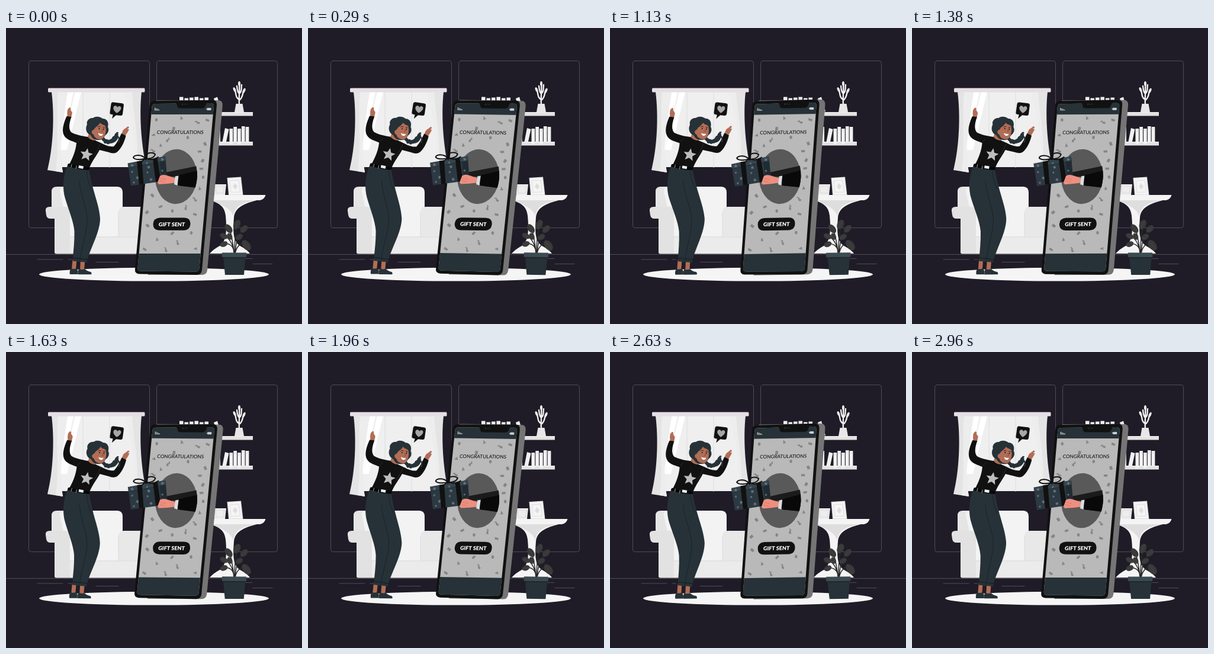
Write an HTML page with a canvas that moves like this. It is 500 px wide and 500 px high and loops after 3 s.

```html
<!DOCTYPE html>
<html lang="en">
<head>
<meta charset="utf-8">
<title>Gift sent</title>
<style>
html, body { margin: 0; width: 100%; height: 100%; overflow: hidden; background: #1f1c27; }
canvas { display: block; width: 500px; height: 500px; }
</style>
</head>
<body>
<canvas id="stage"></canvas>
<script>
const canvas = document.getElementById('stage');
const ctx = canvas.getContext('2d');
const ratio = Math.max(1, window.devicePixelRatio || 1);
canvas.width = canvas.height = 500 * ratio;

const INK = '#111111', SLATE = '#263238', SKIN = '#b26d55', ROSE = '#ee8f80';
const paths = new Map();

function path(d) {
  if (!paths.has(d)) paths.set(d, new Path2D(d));
  return paths.get(d);
}
function fill(color, d) {
  ctx.fillStyle = color;
  ctx.fill(path(d));
}
function line(color, width, d) {
  ctx.strokeStyle = color;
  ctx.lineWidth = width;
  ctx.lineCap = ctx.lineJoin = 'round';
  ctx.stroke(path(d));
}
function box(color, x, y, w, h, r = 0) {
  ctx.fillStyle = color;
  ctx.beginPath();
  ctx.roundRect(x, y, w, h, r);
  ctx.fill();
}
function oval(color, x, y, rx, ry = rx, turn = 0) {
  ctx.fillStyle = color;
  ctx.beginPath();
  ctx.ellipse(x, y, rx, ry, turn, 0, Math.PI * 2);
  ctx.fill();
}
function star(color, x, y, r, turn = 0) {
  ctx.fillStyle = color;
  ctx.beginPath();
  for (let i = 0; i < 10; i++) {
    const a = turn - Math.PI / 2 + i * Math.PI / 5;
    const q = i % 2 ? r * 0.45 : r;
    ctx.lineTo(x + q * Math.cos(a), y + q * Math.sin(a));
  }
  ctx.fill();
}
function label(text, x, y, font, color) {
  ctx.save();
  ctx.translate(x, y);
  ctx.transform(1, 0, -0.09, 1, 0, 0);
  ctx.font = font;
  ctx.fillStyle = color;
  ctx.textAlign = 'center';
  ctx.textBaseline = 'alphabetic';
  ctx.fillText(text, 0, 0);
  ctx.restore();
}
function sway(x, y, angle, draw) {
  ctx.save();
  ctx.translate(x, y);
  ctx.rotate(angle);
  ctx.translate(-x, -y);
  draw();
  ctx.restore();
}

// Degrees: up to +1 at a quarter, down to -1 at three quarters, linear.
function tilt(ms) {
  const p = (ms % 1500) / 1500;
  if (p < 0.25) return p * 4;
  return p < 0.75 ? 2 - p * 4 : p * 4 - 4;
}

function drawRoom() {
  const wall = '#5b5861';
  ctx.strokeStyle = wall;
  ctx.lineWidth = 0.8;
  for (const x of [38.5, 254.5]) {
    ctx.beginPath();
    ctx.roundRect(x, 55.5, 204, 282, 4);
    ctx.stroke();
  }
  line(wall, 0.8, 'M0 382.5H500M53 391H96M105 391H111M152 395.5H190M395 389.5H416M417 398.5H450');
}

function drawWindow() {
  box('#efefef', 84, 107, 143, 128);
  line('#e3e3e3', 1.5, 'M130 108V235M175 108V235');
  fill('#ffffff', 'M103 108H114L97 188L91 212Z');
  fill('#ffffff', 'M117 108H127L103 206H93Z');
  fill('#e4e4e4', 'M77 108H104C101 130 92 165 92 198C92 216 94 230 96 244L70 240C80 200 82 148 77 108Z');
  fill('#ededed', 'M88 108H104C101 130 92 165 92 198C92 216 94 230 96 244L84 242C90 200 84 150 88 108Z');
  fill('#e4e4e4', 'M201 108H229C225 145 228 195 237 235H216C223 190 211 145 201 108Z');
  fill('#ededed', 'M201 108H213C216 150 225 190 221 235H216C223 190 211 145 201 108Z');
  box('#e5dfe5', 71, 101.5, 163.5, 7, 1.5);
}

function drawSofa() {
  fill('#e5e5e5', 'M77 306V276Q77 268 86 268H120V320H77Z');
  fill('#f3f3f3', 'M99 312L91 276Q90 268 98 268H188Q197 268 197 278V330H99Z');
  box('#f3f3f3', 100, 310, 126, 48);
  fill('#e8e8e8', 'M190 310Q191 302 199 302H238V353H190Z');
  box('#ebebeb', 82, 352, 147, 29.5, 3);
  fill('#e2e2e2', 'M67 309Q66 302 74 302H101Q108 303 108 312V381H87Q82 381 82 375V322H75Q69 322 68 316Z');
  line('#d7d7d7', 0.8, 'M108 353H226M190 311V353');
}

function drawShelves() {
  box('#e2e2e2', 285, 142, 132, 6.5);
  box('#f0f0f0', 285, 142, 132, 1.5);
  box('#e2e2e2', 285, 192, 132, 6.5);
  box('#f0f0f0', 285, 192, 132, 1.5);

  for (let i = 0; i < 6; i++) box('#f0f0f0', 293 + i * 8.5, 116.5 + (i * 2 % 3), 6.5, 26);
  fill('#f0f0f0', 'M351 119L357 116.5L364 141H357Z');

  box('#efefef', 355, 167, 7, 25);
  fill('#f1f1f1', 'M370 169L376.5 171L372 192H365.5Z');
  for (let i = 0; i < 5; i++) {
    box('#f1f1f1', 377.5 + i * 6.8, [170, 167, 170, 166, 167][i], 5.7, 26);
  }
  line('#d5d5d5', 0.7, 'M378 174H383M385 171H390M392 174H397M398.5 170H403.5M405 171H410');

  line('#f2f2f2', 2.4, 'M394 129C393 119 395 108 394 93M394 121C386 117 390 108 385 102M394 122C402 116 398 109 403 104M394 111C390 107 391 103 390 98M395 110C399 106 397 101 398 96');
  oval('#f2f2f2', 394, 94, 2, 4);
  oval('#f2f2f2', 386, 104, 2, 4, -0.35);
  oval('#f2f2f2', 402, 106, 2, 4.5, 0.4);
  fill('#e7e7e7', 'M388.5 128H399.5L402 142H386Z');
}

function drawTable() {
  fill('#f4f4f4', 'M343 289H432C406 295 387 301 385 320C383 347 384 362 397 369Q408 375 412 381H344Q351 373 363 367C373 358 373 338 371 317C369 299 358 296 343 289Z');
  fill('#dedede', 'M344 290H428C402 294 386 299 384 318C379 302 357 296 344 290Z');
  fill('#f4f4f4', 'M338 282H438.5Q437 289 429 291H338Z');

  fill('#ededed', 'M352 264H372L370 282H352Z');
  line('#d5d5d5', 0.8, 'M355 267H369L367.5 279H355Z');
  fill('#e0e0e0', 'M373.5 253L397 251.5L400.5 282H376Z');
  fill('#f5f5f5', 'M375 254.2L396 253L399 281H377.5Z');
  line('#d9d9d9', 0.8, 'M378.5 258L393 257L395.5 277L380.5 277.5Z');
  fill('#dedede', 'M386.5 262L391 267L388 273L383 268Z');
}

function drawPlant() {
  line('#292929', 1.5, 'M385 381C384 365 380 347 377 336M386 381C386 362 388 344 391 334M387 381C388 362 393 346 403 341M387 381C389 370 396 362 404 364M385 378C384 367 376 363 366 364M384 372C381 362 376 354 369 352');
  const leaf = (x, y, rx, ry, turn) => {
    oval('#393939', x, y, rx, ry, turn);
    ctx.save();
    ctx.translate(x, y);
    ctx.rotate(turn);
    line('#4b4b4b', 0.5, `M0 ${-ry + 1}V${ry - 1}`);
    ctx.restore();
  };
  leaf(376, 339, 5.2, 8.5, -0.65);
  leaf(390, 332, 5.5, 8.5, 0.45);
  leaf(402, 339.5, 5, 7.5, 0.8);
  leaf(406, 367, 6.2, 10, -0.65);
  leaf(368, 351.5, 4.6, 7, -1.15);
  leaf(368, 365, 4.5, 6.6, 1.2);
  leaf(394, 353, 4.6, 6.5, 1.05);
  leaf(378, 352, 4, 6, -0.5);
  fill(SLATE, 'M367 386H404.5L402 417H370Z');
  fill('#1e282d', 'M367 386H404.5L404.2 389H367.3Z');
  box('#3c4a51', 364.8, 379.5, 41.4, 7.5, 0.5);
}

function drawWoman() {
  // Feet
  fill(SKIN, 'M112.5 391H119.5L118 408H111Z');
  fill(SKIN, 'M126 392H133.5L132 409H125Z');
  fill(SLATE, 'M110 406Q114 408 119 406L121.5 410V416H108Q106.5 411 110 406Z');
  fill(SLATE, 'M123 406.5Q128 409 133 407Q137 411 143 412Q145.5 414 144 416.3H121.5Q121 411 123 406.5Z');

  // Trousers
  fill(SLATE, 'M104 232C96 249 95 272 100 288C106 308 114 326 115.5 343C116 360 114 376 112.5 393.5L136.5 396C141 374 159 346 159 322C158 299 145 273 140 237Z');
  line('#1a2429', 1, 'M124 258C126 287 139 306 137 330C135 352 127 371 125 393M136 242C137 252 140 264 144 272');
  line('#182125', 1.3, 'M113.5 388L137.5 391');

  // Hands and neck
  fill(SKIN, 'M104 151C103 145 103 140 104.5 137L107.5 134L109.5 135.5L109 138L112 143L110 152Z');
  fill(SKIN, 'M195 181C196 175 198 171 201 170L206 166L208 168L205 171L208 171L206 175L201 183Z');
  fill(SKIN, 'M140 179L152 182L151 194Q141 194 137 186Z');

  // Top
  fill(INK, 'M102.5 149L110.5 150C107 160 105 170 110 176C117 180 126 182 138 184Q143 190 151 190L160 194C168 198 175 201 182 200C188 194 191 186 195 178L202.5 182C200 193 194 205 187 210Q182 213 174 210L158 206C153 216 144 226 140 239L106 232C113 219 118 207 119 194C112 191 103 189 99 183C93 175 97 161 102.5 149Z');
  line('#333333', 0.8, 'M159 196Q156 205 148 217M120 192L125 187');
  star('#bdbdbd', 135.7, 214, 11.3, 0.2);

  // Belt
  line('#070707', 5, 'M106.5 231.5Q121 236 138.5 237.5');
  fill('#eeeeee', 'M123 232L131 233.5L130.2 238L122.3 236.5Z');
  line('#d0d0d0', 0.8, 'M111 230.5L110 235M119 233L118.3 237.5');

  // Hair and face
  fill(SLATE, 'M143 181C136 179 133 170 137 163C135 157 141 151 147 152C152 148 160 150 163 153C171 153 174 160 172 167C175 173 172 178 168 181L163 188C153 191 146 188 143 181Z');
  line(SLATE, 5.5, 'M163 186Q169 194 176 192Q184 192 187 184');
  for (let i = 0; i < 5; i++) {
    oval(SLATE, 169 + i * 4.3, 190.5 + [1, 2, 0.5, -4, -9][i], 4.3, 3.1, -0.6 - i * 0.15);
  }
  line(SLATE, 2.2, 'M187 181Q186 176 189 177M188 182Q193 187 190 193');
  fill(SKIN, 'M145 174C147 172 149 172 150 169C153 166 156 165 159 160C162 164 166 163 168 166C170 173 168 183 163 187C157 190 149 186 148 180Q144 179 145 174Z');
  oval(INK, 157.5, 170, 0.8, 1.2);
  oval(INK, 164.8, 171, 0.8, 1.2);
  line(INK, 0.8, 'M155.5 167Q157.5 165.5 159.5 166.8M163.8 168Q165.6 167 167 168.6');
  line('#7e4437', 0.7, 'M162 171L163.5 175L161 175.4');
  fill('#ffffff', 'M155 177Q160 180 164.5 178.5Q163 183.5 159 182.5Q156 181.5 155 177Z');
  line('#74362f', 0.5, 'M155 177Q156 181.5 159 182.5Q163 183.5 164.5 178.5');
}

function drawBubble() {
  fill(INK, 'M181.5 125.4L196.3 127.3Q199.3 127.8 198.9 130.8L197 145.5Q196.5 148.3 193.5 148L186 147.2L179 153.3L180.7 146.3L178 146Q175 145.5 175.5 142.5L177.5 128.5Q178 125 181.5 125.4Z');
  fill('#a6a6a6', 'M187 143.8C182 139.5 180 135.5 182.2 132.5C184.5 130 187.6 131.5 188.2 134.2C189.6 131.5 193 131.2 194.3 134.2C195.3 138 191 141.5 187 143.8Z');
}

const bits = [
  254,155, 296,152, 323,159, 340,156, 283,170, 249,181, 274,189, 307,185,
  336,196, 261,198, 248,207, 327,209, 332,224, 239,225, 333,252, 330,238,
  247,283, 327,271, 319,289, 261,302, 238,311, 281,309, 304,303, 319,315,
  239,334, 255,357, 290,362, 281,347, 313,346, 320,373, 270,374, 234,374
];
const bitShapes = [
  'M-2 -3H2.5V3H-2Z',
  'M-3 -2L3.5 -1L1 3.5Z',
  'M-2 -4Q2 -3 1 -1Q0 1 3 3L0 5Q-3 2 -1.5 0Q0 -2 -3 -3Z',
  'M-3.5 -1.5L3 -2.5L3.5 1L-2.5 2Z'
];

function drawConfetti() {
  for (let i = 0; i < bits.length / 2; i++) {
    const x = bits[2 * i], y = bits[2 * i + 1];
    if (i % 7 === 0) {
      oval('#858585', x, y, 2.2, 2.8);
      continue;
    }
    ctx.save();
    ctx.translate(x, y);
    ctx.rotate(Math.sin(i * 2.3) * 0.9);
    fill('#858585', bitShapes[i % 4]);
    ctx.restore();
  }
}

function drawGift() {
  fill('#2c3942', 'M206 229L269 217L272 251L270 258L211 266.5Z');
  fill('#202b32', 'M259 219L269 217L272 251L263 259Z');
  fill('#34434c', 'M205.5 228.5L269 216.5L270.5 224L206.5 236Z');
  line('#202b32', 0.7, 'M206.5 236.5L270 224.5');
  const spots = [213,232, 238,228, 264,222, 213,243, 222,253, 239,244, 245,256, 216,261, 241,235, 264,241];
  for (let i = 0; i < spots.length; i += 2) {
    star('#66757e', spots[i], spots[i + 1], i % 4 ? 2.4 : 3.4, i);
  }
  fill(INK, 'M221 225.5L229.5 224L232.5 263.5L225 264.5Z');
  fill(INK, 'M248 221L255.5 219.5L260 249L259.5 259L253 260Z');
  line(INK, 2, 'M236 221C228 212 216 215 215 219C218 223 229 223 236 220C235 210 246 209 252 213C251 219 243 221 236 221');
  line(INK, 2, 'M235 220Q229 227 224 227M237 220Q246 225 257 218');
}

function drawPhone() {
  fill('#757575', 'M254 122H358Q366.5 122 365.8 131L340 409Q339 417 331 417H240Z');
  fill(INK, 'M250 123L348 121.7Q356.5 121.5 356 130L331 409Q330 417 322 417L225 415.5Q217 415 218 407L242.5 131Q243 123.5 250 123Z');

  ctx.save();
  ctx.clip(path('M252 128L346 127Q351.5 127 351 132L326.5 406Q326 411.5 320 411.5L228 410.5Q222 410.5 222.5 405L246.5 133Q247 128 252 128Z'));
  box('#b9b9b9', 215, 120, 150, 300);
  box(SLATE, 215, 120, 150, 26);
  box(SLATE, 215, 381, 150, 40);
  drawConfetti();
  ctx.restore();

  fill(INK, 'M285 126.5L341 126Q338 127 337.5 130Q336 135.5 331 135.5H294Q289 135.5 289 130.5Q288.5 127 285 126.5Z');
  oval('#34343a', 298, 128.8, 1.3);
  line('#34343a', 0.9, 'M301 128.8H306');
  for (let i = 0; i < 4; i++) box('#c8cdd0', 251 + i * 2.2, 134.8 + i * 0.9, 1.3, 4.6 - i * 0.9);
  box('#c8cdd0', 339.5, 135, 7, 4, 0.8);
  box('#c8cdd0', 338.3, 136.2, 1.2, 1.7);

  label('CONGRATULATIONS', 294, 179.3, '500 8.2px Lato, "Open Sans", sans-serif', INK);

  oval('#595959', 287.3, 251, 35.4, 46.2, 0.04);
  ctx.save();
  ctx.clip(path('M240 200H300Q323 215 323 251Q320 285 300 299H240Z'));
  fill('#1b1b1b', 'M269 244L323 233V270L291 266L287 251L271 252Z');
  fill('#090909', 'M290 249L323 241V270L290 266Z');
  ctx.restore();

  drawGift();
  fill(ROSE, 'M256 261L260 250Q264 247 270 248.5L286 253.5L285 261.5L273 263L258 264Z');
  line('#c96d62', 0.6, 'M261 254L270 256M260 258L268 260');
  fill('#d9dde1', 'M286 250.5L291.5 249.5L289.5 266L284 264Z');

  fill(INK, 'M260 320.5H301Q311.5 320.5 311.5 330.5Q311 341.5 300 341.8H259Q248.5 341.5 248.5 331.5Q249 321 260 320.5Z');
  label('GIFT SENT', 279.8, 334.6, '900 9px Lato, "Open Sans", sans-serif', '#ffffff');
}

function render(ms) {
  const angle = tilt(ms) * Math.PI / 180;
  ctx.setTransform(ratio, 0, 0, ratio, 0, 0);
  box('#1f1c27', 0, 0, 500, 500);
  drawRoom();
  drawWindow();
  drawSofa();
  drawShelves();
  drawTable();
  oval('#f5f5f5', 250, 416.2, 194, 11.4);
  sway(387, 371, angle, drawPlant);
  sway(286, 269, angle, drawPhone);
  sway(151, 275, angle, drawWoman);
  sway(187, 139, angle, drawBubble);
}

const start = performance.now();
function tick() {
  render((performance.now() - start) % 3000);
  requestAnimationFrame(tick);
}
tick();
</script>
</body>
</html>
```
